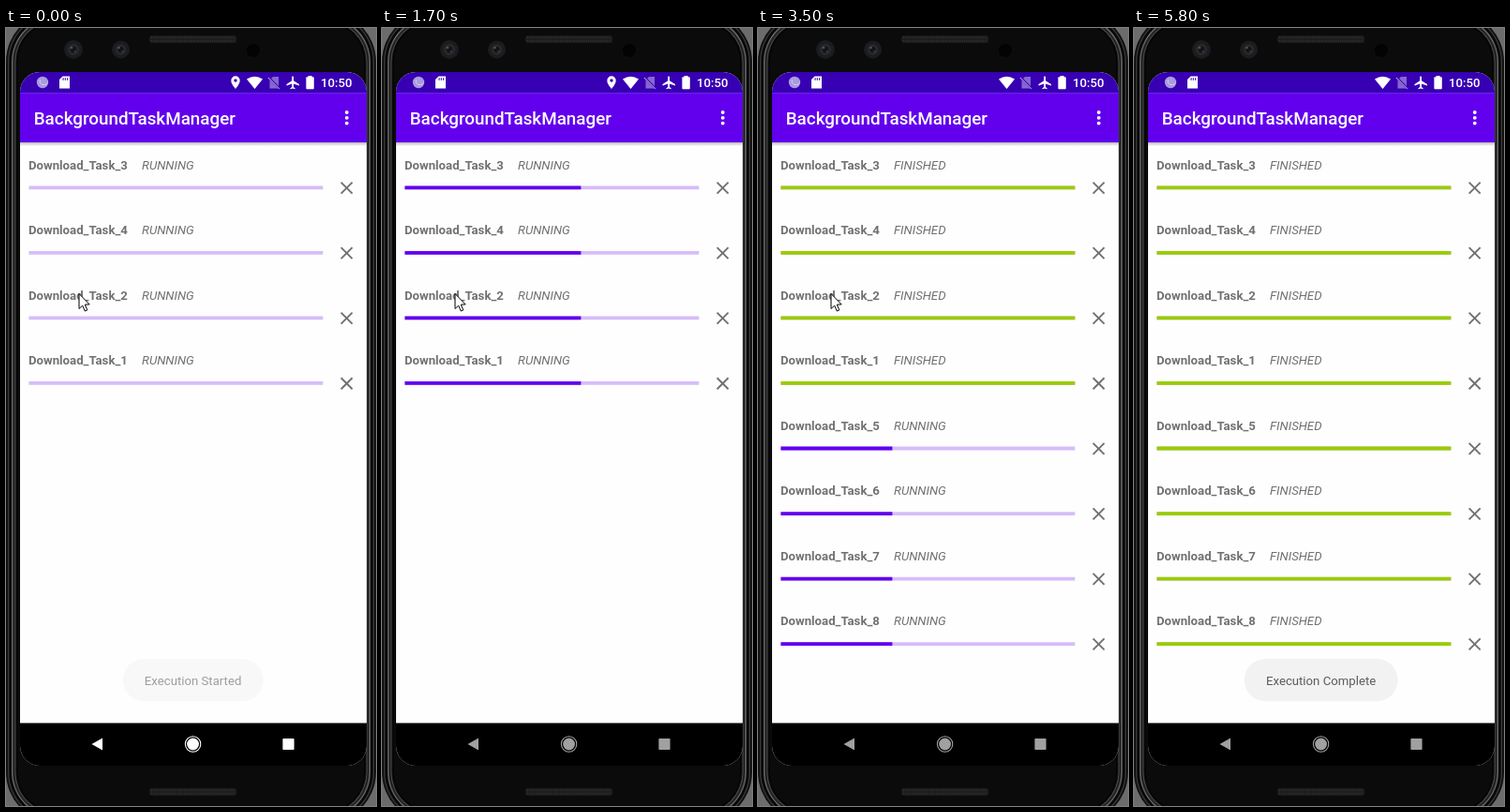
These frames come from a looping animation (395 px wide and 830 px high, 5900 ms). An HTML page with a canvas:

```html
<!DOCTYPE html>
<html lang="en">
<head>
<meta charset="utf-8">
<title>Background tasks</title>
<style>
html, body { margin: 0; width: 100%; height: 100%; overflow: hidden; background: #000; }
canvas { display: block; width: 395px; height: 830px; }
</style>
</head>
<body>
<canvas id="stage"></canvas>
<script>
const W = 395, H = 830, LOOP = 5900, TICK = 100;
const FONT = 'Roboto, "Open Sans", sans-serif';
const cv = document.getElementById('stage');
const ratio = window.devicePixelRatio || 1;
cv.width = W * ratio;
cv.height = H * ratio;
const c = cv.getContext('2d');
c.scale(ratio, ratio);

// Each key is [time, value]; values between keys are linear.
function track(keys, t) {
  if (t <= keys[0][0]) return keys[0][1];
  for (let i = 1; i < keys.length; i++) {
    const [t0, a] = keys[i - 1], [t1, b] = keys[i];
    if (t <= t1) return a + (b - a) * (t - t0) / (t1 - t0);
  }
  return keys[keys.length - 1][1];
}

const BATCHES = [
  { ids: [3, 4, 2, 1], row: 0, show: 0, done: 2300,
    bar: [[0, 0], [500, 52], [600, 59], [1200, 124], [1700, 188], [2300, 263], [2400, 292], [2500, 314]] },
  { ids: [5, 6, 7, 8], row: 4, show: 2200, done: 4700,
    bar: [[2400, 0], [3000, 56], [3500, 119], [3600, 124], [4200, 189], [4700, 251], [4800, 278], [4900, 314]] }
];
const TOASTS = [
  { text: 'Execution Started', w: 150,
    alpha: [[0, .42], [200, 1], [800, 1], [1100, 0]] },
  { text: 'Execution Complete', w: 164,
    alpha: [[4700, 0], [5000, 1], [5700, 1], [5800, .72]] }
];
const NAV = [[0, 255], [100, 255], [500, 160]];
const CURSOR_X = [[5200, 77.5], [5400, 141], [5700, 292]];
const CURSOR_Y = [[5200, 283], [5400, 456], [5700, 758]];

function box(x, y, w, h, r, fill) {
  c.beginPath();
  c.roundRect(x, y, w, h, r);
  c.fillStyle = fill;
  c.fill();
}

function dot(x, y, r, fill) {
  c.beginPath();
  c.arc(x, y, r, 0, Math.PI * 2);
  c.fillStyle = fill;
  c.fill();
}

function poly(points, fill) {
  c.beginPath();
  points.forEach(([x, y]) => c.lineTo(x, y));
  c.closePath();
  c.fillStyle = fill;
  c.fill();
}

function line(x0, y0, x1, y1, color, width) {
  c.beginPath();
  c.moveTo(x0, y0);
  c.lineTo(x1, y1);
  c.strokeStyle = color;
  c.lineWidth = width;
  c.stroke();
}

function label(text, x, y, style, size, fill, align = 'left') {
  c.font = `${style} ${size}px ${FONT}`;
  c.textAlign = align;
  c.fillStyle = fill;
  c.fillText(text, x, y);
}

function speaker(y) {
  box(153, y, 93, 8, 3, '#1d1d1d');
  for (let x = 155; x < 245; x += 2.5) {
    box(x, y + 1.5, 1, 1.5, 0, '#343434');
    box(x, y + 5, 1, 1.5, 0, '#343434');
  }
}

function lens(x, r) {
  dot(x, 23, r, '#1b1c1e');
  dot(x, 23, r * .62, '#26282b');
  dot(x, 23, r * .32, '#111317');
  dot(x - 2, 21, 1.3, '#50545a');
  dot(x + 2, 25, 1.1, '#3d4147');
}

function phone() {
  box(0, 0, W, H, 0, '#6c6c6c');
  const rims = [[0, '#101010'], [2, '#3c3c3c'], [3.2, '#080808'], [6, '#707070'],
    [7.2, '#242424'], [9.5, '#4a4a4a'], [10.5, '#050505'], [12.5, '#0b0b0b']];
  for (const [d, fill] of rims) {
    box(d, d - 18, W - 2 * d, H + 36 - 2 * d, 54 - d, fill);
  }
  speaker(8);
  speaker(811);
  lens(72, 10);
  lens(122.5, 9.5);
  dot(264, 24, 7, '#030303');
}

function statusIcons(t) {
  dot(39, 58, 6.2, '#a99be0');
  c.beginPath();
  c.arc(40.5, 56.5, 4.2, .4, 3.4);
  c.strokeStyle = '#d6cdf3';
  c.lineWidth = 1;
  c.stroke();

  poly([[60.5, 51.5], [68, 51.5], [68, 64.5], [57, 64.5], [57, 55]], '#fff');
  for (const x of [60.5, 62.8, 65.1]) box(x, 53.2, 1.1, 2.6, 0, '#3700b3');

  if (t < 2700) {
    c.beginPath();
    c.arc(245, 56, 4.7, Math.PI, 0);
    c.quadraticCurveTo(249.7, 59.5, 245, 65);
    c.quadraticCurveTo(240.3, 59.5, 240.3, 56);
    c.fillStyle = '#fff';
    c.fill();
    dot(245, 56, 1.7, '#3700b3');
  }

  c.beginPath();
  c.moveTo(265.5, 65);
  c.lineTo(257, 54.5);
  c.quadraticCurveTo(265.5, 48.8, 274, 54.5);
  c.closePath();
  c.fillStyle = '#fff';
  c.fill();

  poly([[285, 52], [291, 52], [291, 64.5], [281.5, 64.5], [281.5, 55.5]], '#8768cf');
  line(280, 52.5, 292.5, 65, '#3700b3', 2.4);
  line(279.8, 52.8, 291.8, 64.8, '#a890dd', 1.1);

  poly([[305.2, 52], [306, 51.2], [307, 52], [307, 56.2], [313, 60], [313, 61.5],
    [307, 59.6], [307, 63], [308.6, 64.2], [308.6, 65.3], [306, 64.6], [303.5, 65.3],
    [303.5, 64.2], [305.2, 63], [305.2, 59.6], [299.5, 61.5], [299.5, 60], [305.2, 56.2]], '#fff');

  box(322.6, 51, 4, 2.5, .4, '#fff');
  box(320.4, 52.3, 8.4, 13, 1, '#fff');
  label('10:50', 336, 63, '500', 13.19, '#fff');
}

function header(t) {
  box(15, 47, 370, 22.5, 0, '#3700b3');
  const shade = c.createLinearGradient(0, 122, 0, 126);
  shade.addColorStop(0, 'rgba(0,0,0,.27)');
  shade.addColorStop(1, 'rgba(0,0,0,0)');
  box(15, 122, 370, 4, 0, shade);
  box(15, 69.3, 370, 52.7, 0, '#6200ee');
  statusIcons(t);
  label('BackgroundTaskManager', 29.7, 103, '500', 18.84, '#fff');
  for (const y of [90, 95.8, 101.6]) dot(363.8, y, 1.9, '#fff');
}

function task(id, row, done, len) {
  const y = row * 69.55;
  label('Download_Task_' + id, 24, y + 150.6, 'bold', 13.19, '#717171');
  label(done ? 'FINISHED' : 'RUNNING', 145, y + 150.6, 'italic 400', 13.19, '#717171');
  box(24.4, y + 168.4, 314, 3.8, 0, '#d7bcfa');
  if (len) box(24.4, y + 168.4, len, 3.8, 0, done ? '#99cc00' : '#6200ee');
  line(357.7, y + 164.6, 369.7, y + 176.6, '#717171', 1.9);
  line(369.7, y + 164.6, 357.7, y + 176.6, '#717171', 1.9);
}

function toast({ text, w, alpha }, t) {
  const a = track(alpha, t);
  if (!a) return;
  c.globalAlpha = a;
  box(199.7 - w / 2, 673, w, 45.3, 22.6, '#efefef');
  label(text, 199.6, 701, '400', 13.19, '#222', 'center');
  c.globalAlpha = 1;
}

function navBar(t) {
  box(15, 741.5, 370, 46, 0, '#000');
  const v = Math.round(track(NAV, t)), tone = `rgb(${v},${v},${v})`;
  poly([[91.5, 764], [103, 757.6], [103, 770.4]], tone);
  c.beginPath();
  c.arc(199.6, 764, 8.2, 0, Math.PI * 2);
  c.strokeStyle = tone;
  c.lineWidth = 1.1;
  c.stroke();
  dot(199.6, 764, 6.4, tone);
  box(295.4, 757.9, 12.2, 12.2, .8, tone);
}

function cursor(t) {
  if (t >= 5800) return;
  c.save();
  c.translate(track(CURSOR_X, t) + .5, track(CURSOR_Y, t) + .5);
  poly([[0, 0], [0, 16], [3.7, 12.6], [6.3, 18.5], [8.8, 17.4], [6.3, 11.6], [11.2, 11.4]], '#fff');
  c.strokeStyle = '#000';
  c.lineWidth = 1;
  c.stroke();
  c.restore();
}

function draw(t) {
  phone();
  c.save();
  c.beginPath();
  c.roundRect(15, 47, 370, 740, 21);
  c.clip();
  box(15, 47, 370, 740, 0, '#fefefe');
  header(t);
  for (const b of BATCHES) {
    if (t < b.show) continue;
    b.ids.forEach((id, i) => task(id, b.row + i, t >= b.done, track(b.bar, t)));
  }
  TOASTS.forEach(m => toast(m, t));
  navBar(t);
  c.restore();
  cursor(t);
}

const start = performance.now();
function frame() {
  const t = (performance.now() - start) % LOOP;
  draw(Math.floor(t / TICK) * TICK);
  requestAnimationFrame(frame);
}
frame();
</script>
</body>
</html>
```
